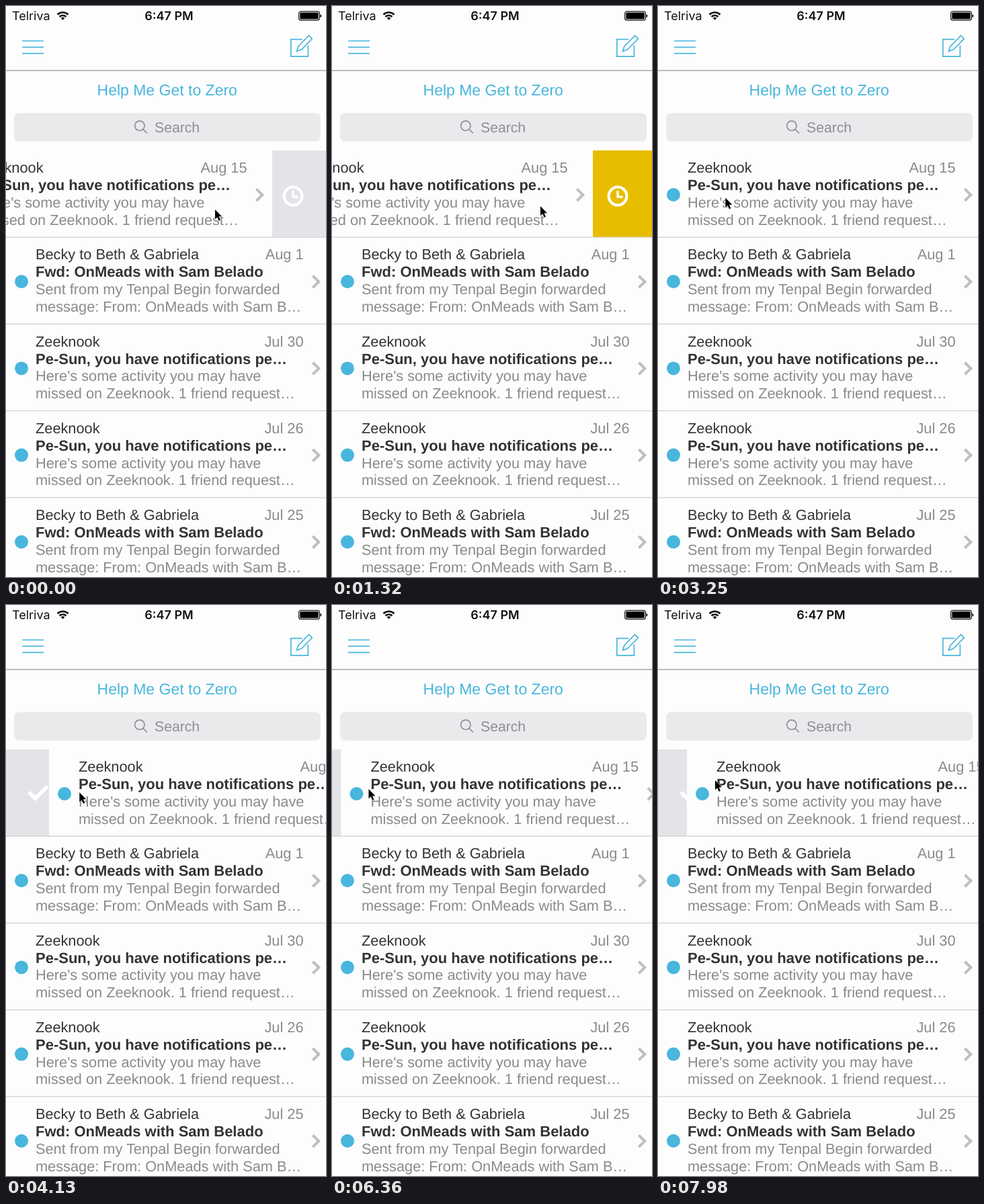
An HTML page that plays this animation: 476 px wide and 850 px high, repeating every 8 s.

```html
<!DOCTYPE html>
<html lang="en">
<head>
<meta charset="utf-8">
<title>Swipeable inbox</title>
<style>
  html, body { margin: 0; width: 100%; height: 100%; overflow: hidden; background: #fdfdfd; }
  svg { display: block; width: 100%; height: 100%; }
  text { font: 21.75px "Liberation Sans", Arial, sans-serif; fill: #8a8a8a; text-rendering: geometricPrecision; }
  .status { font: 18px Inter, sans-serif; fill: #111; }
  .time { font-weight: 600; text-anchor: middle; }
  .link { font-size: 23px; fill: #48b6dd; text-anchor: middle; }
  .search { font-size: 21.2px; fill: #8e8e93; }
  .sender { fill: #333; }
  .subject { font-size: 22px; font-weight: bold; fill: #333; }
  .date { text-anchor: end; }
  .line { fill: none; stroke: #48b6dd; stroke-width: 1.7; }
  .icon { fill: none; stroke: #fff; }
  .chevron { fill: none; stroke: #bfbfc2; stroke-width: 4; }
</style>
</head>
<body>
<svg viewBox="0 0 476 850" preserveAspectRatio="none">
  <rect width="476" height="850" fill="#fdfdfd"/>

  <text class="status" x="9" y="21">Telriva</text>
  <g fill="none" stroke="#111" stroke-width="2.6">
    <path d="M76.5 12.8a11.5 11.5 0 0 1 16 0M79.6 16a7 7 0 0 1 9.8 0"/>
    <path d="M84.5 21l-2.8-3a4 4 0 0 1 5.6 0z" fill="#111" stroke="none"/>
  </g>
  <text class="status time" x="242.5" y="21">6:47 PM</text>
  <rect x="435.6" y="8.1" width="30.8" height="13" rx="3" fill="none" stroke="#111" stroke-width="1.2"/>
  <rect x="437.3" y="9.8" width="27.4" height="9.6" rx="1.4"/>
  <path d="M467.5 12.2a2.6 2.6 0 0 1 0 5z"/>

  <path class="line" d="M24 52H56M24 61.3H56M24 70.6H56"/>
  <path class="line" d="M441 49.6H423.8V75.2H449.4V58.5M432.5 67.3L434.8 60.2 450.5 44 455.3 48.8 439.6 64.8Z"/>
  <rect y="95.3" width="476" height="1.5" fill="#aaa"/>

  <text class="link" x="239.7" y="133.3">Help Me Get to Zero</text>
  <rect x="12" y="159.5" width="456" height="42" rx="7" fill="#e9eaec"/>
  <g fill="none" stroke="#8e8e93" stroke-width="1.7">
    <circle cx="198.8" cy="178.3" r="7.2"/>
    <path d="M204 183.6L210 189.5"/>
  </g>
  <text class="search" x="221" y="187.6">Search</text>

  <g id="panel">
    <rect id="fill" y="215" width="476" height="129.2"/>
    <path id="check" class="icon" stroke-width="6" d="M-14 -1.5L-4.5 8 14 -10.5"/>
    <g id="clock" class="icon">
      <circle r="13.4" stroke-width="4"/>
      <path d="M0 -8V1.2H7.5" stroke-width="3.2"/>
    </g>
  </g>
  <g id="rows"></g>
  <path id="cursor" d="M0 0V14.2L3.2 11.2 5.7 16.8 8 15.8 5.6 10.3H10Z" fill="#000" stroke="#fff" stroke-width="1" paint-order="stroke"/>
</svg>
<script>
const LOOP = 8000, STEP = 148, LEAD = 24;
const ROW_TOP = 215, ROW_HEIGHT = 129.2, ROW_WIDTH = 480, THRESHOLD = 90;
const $ = id => document.getElementById(id);

const notice = ["Zeeknook", "Pe-Sun, you have notifications pe…",
  "Here's some activity you may have", "missed on Zeeknook. 1 friend request…"];
const forward = ["Becky to Beth &amp; Gabriela", "Fwd: OnMeads with Sam Belado",
  "Sent from my Tenpal Begin forwarded", "message: From: OnMeads with Sam B…"];
const mails = [[notice, "Aug 15"], [forward, "Aug 1"], [notice, "Jul 30"], [notice, "Jul 26"], [forward, "Jul 25"]];

function mailRow([[sender, subject, ...preview], date], i) {
  const top = ROW_TOP + i * ROW_HEIGHT;
  return `<g><g transform="translate(0 ${top})">
    <rect width="${ROW_WIDTH}" height="${ROW_HEIGHT}" fill="#fdfdfd"/>
    <circle cx="23" cy="66" r="10" fill="#48b6dd"/>
    <text class="sender" x="44" y="33.3">${sender}</text>
    <text class="date" x="442.5" y="33.3">${date}</text>
    <text class="subject" x="44" y="59.3">${subject}</text>
    <text x="44" y="85">${preview[0]}</text>
    <text x="44" y="110.8">${preview[1]}</text>
    <path class="chevron" d="M456.3 57.4L465.3 66.2 456.3 75"/>
  </g></g>`;
}
const separators = mails.slice(1).map((_, i) =>
  `<rect y="${ROW_TOP + (i + 1) * ROW_HEIGHT - 0.6}" width="476" height="1.2" fill="#cfcfd1"/>`);
$("rows").innerHTML = mails.map(mailRow).join("") + separators.join("");
const firstRow = $("rows").firstElementChild;

// Keys are [step, value]; steps are the ticks at which the picture refreshes.
const shiftKeys = [[0, -84], [4, -190], [9, -92], [13, -12], [14, -6], [16, -6], [18, 0], [24, 0],
  [28, 64], [32, 165], [35, 250], [36, 247], [39, 140], [42, 30], [44, 6], [45, 6],
  [49, 273], [53, 68], [54, 43]];
const grabKeys = [[0, 395], [9, 402], [14, 399], [16, 399], [24, 45], [36, 46], [49, 37], [54, 42]];
const heightKeys = [[0, 303], [9, 298], [14, 297], [16, 297], [24, 282], [28, 279], [36, 277], [49, 270], [54, 261]];

// Monotone cubic interpolation: passes through every key without overshoot.
function track(keys, at) {
  const slope = i => i < 0 || i > keys.length - 2 ? 0 :
    (keys[i + 1][1] - keys[i][1]) / (keys[i + 1][0] - keys[i][0]);
  const tangent = i => {
    const a = i > 0 ? slope(i - 1) : slope(0);
    const b = i < keys.length - 1 ? slope(i) : a;
    return a * b <= 0 ? 0 : 2 * a * b / (a + b);
  };
  let i = 0;
  while (i < keys.length - 2 && at >= keys[i + 1][0]) i++;
  const [x0, y0] = keys[i], [x1, y1] = keys[i + 1], span = x1 - x0;
  const u = Math.min(1, (at - x0) / span), v = 1 - u;
  return v * v * ((1 + 2 * u) * y0 + u * span * tangent(i)) +
    u * u * ((3 - 2 * u) * y1 - v * span * tangent(i + 1));
}

const place = (el, x, y) => el.setAttribute("transform", `translate(${x} ${y})`);

function render(time) {
  const step = Math.floor((time % LOOP + LEAD) / STEP);
  const shift = track(shiftKeys, step);
  const archiving = shift > 0;
  const active = archiving ? "#5dd947" : "#e8bd00";

  $("fill").setAttribute("fill", Math.abs(shift) < THRESHOLD ? "#e3e4e8" : active);
  $("check").setAttribute("visibility", archiving ? "visible" : "hidden");
  $("clock").setAttribute("visibility", archiving ? "hidden" : "visible");
  place($("check"), Math.max(48, shift - 42), 280);
  place($("clock"), Math.min(427, ROW_WIDTH + shift + 37), 283);
  place(firstRow, shift, 0);
  place($("cursor"), shift + track(grabKeys, step), track(heightKeys, step));
}

const start = performance.now();
function tick() {
  render(performance.now() - start);
  requestAnimationFrame(tick);
}
tick();
</script>
</body>
</html>
```
